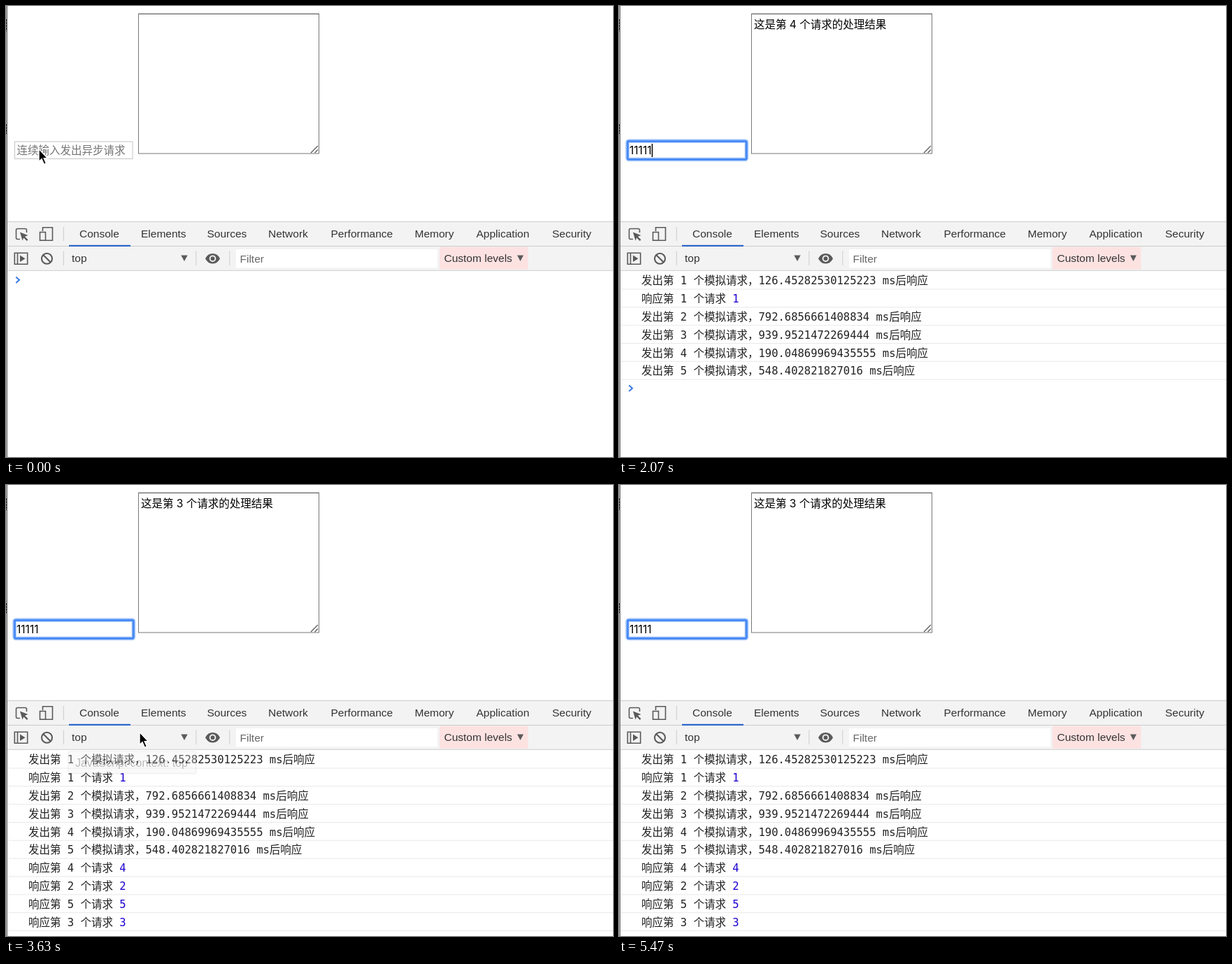
Write an HTML page that moves like this. It is 868 px wide and 645 px high and loops after 5910 ms.

```html
<!DOCTYPE html>
<html lang="zh-CN">
<head>
<meta charset="utf-8">
<style>
  html, body { margin: 0; width: 100%; height: 100%; overflow: hidden; background: #fff; }
  svg { display: block; }
  text { white-space: pre; }
  .ui { font: 15.5px "Liberation Sans", Arial, sans-serif; fill: #333; }
  .page { font: 15.5px Inter, "Noto Sans CJK SC", "Noto Sans CJK", sans-serif; }
  .log { font: 15.5px "DejaVu Sans Mono", "Noto Sans CJK SC", "Noto Sans CJK", monospace; fill: #222; }
  .num { fill: #1c00cf; }
  .icon { fill: none; stroke: #5a5a5a; stroke-width: 1.6; }
  .solid { fill: #5a5a5a; }
  .rule { stroke: #ccc; }
</style>
</head>
<body>
<svg width="868" height="645" viewBox="0 0 868 645">
  <path d="M1.3 0V645" stroke="#606060" stroke-width="1.4"/>
  <path d="M.4 19V36M.4 169V183" stroke="#222" stroke-dasharray="3 1"/>

  <!-- page -->
  <rect x="189.5" y="11.5" width="258" height="199.5" fill="#fff" stroke="#777"/>
  <path d="M189 11.2H448" stroke="#666"/>
  <path d="M436 210L446 200M441.5 210L446 205.500" stroke="#555" stroke-width="1.2"/>
  <text id="result" class="page" x="193" y="31.500"></text>
  <rect x="12.5" y="194" width="168.5" height="24.500" fill="#fff" stroke="#c4c4c4"/>
  <g id="ring" fill="none" stroke="#4a8cf5">
    <rect x="12" y="193" width="170.500" height="26.500" rx="2.500" stroke-width="6" opacity=".35"/>
    <rect x="12.300" y="193.300" width="170" height="26" rx="1.500" stroke-width="3.200"/>
  </g>
  <text id="hint" class="page" x="15.500" y="212" fill="#757575">连续输入发出异步请求</text>
  <text id="typed" class="page" x="15" y="212"></text>
  <rect id="caret" y="197" width="1.500" height="19"/>

  <!-- devtools bars -->
  <rect x="2" y="308" width="866" height="70" fill="#f3f3f3"/>
  <path class="rule" d="M2 308.500H868M2 343.500H868M2 378.300H868M82.300 316V336M82.300 350.500V371M271.800 350.500V371M319.800 350.500V371"/>
  <rect x="90" y="341.800" width="88" height="2.200" fill="#2a66c9"/>
  <g id="tabs" class="ui"></g>
  <path class="icon" d="M29.500 324V320.500Q29.500 318.500 27.500 318.500H16.500Q14.500 318.500 14.500 320.500V331.500Q14.500 333.500 16.500 333.500H20"/>
  <path class="solid" d="M20 323.500L31.500 328 27 329.800 31.500 334.300 29.800 336 25.300 331.500 23.500 335.500Z"/>
  <path class="icon" d="M52.500 322V316.800H66.500V335.200H57"/>
  <rect class="icon" x="48.500" y="323.500" width="8" height="11.700"/>
  <path class="icon" d="M12.300 353.300H30.700V369.200H12.300ZM16.500 353V369"/>
  <path class="solid" d="M20 356.500L27.500 361.200 20 366Z"/>
  <g class="icon" style="stroke-width:2.100">
    <circle cx="58.500" cy="361.200" r="7.500"/>
    <path d="M53.200 355.900L63.800 366.500"/>
  </g>
  <text class="ui" x="94" y="366">top</text>
  <path class="solid" d="M250.300 356.500H259.700L255 365Z"/>
  <path class="solid" d="M285 361.200Q288.500 354 295.500 354T306 361.200Q302.500 368.400 295.500 368.400T285 361.200Z"/>
  <circle cx="295.500" cy="361.200" r="4.800" fill="#f3f3f3"/>
  <circle class="solid" cx="295.500" cy="361.200" r="2.900"/>
  <rect x="329" y="348" width="288" height="26.500" fill="#fff"/>
  <text class="ui" x="334.500" y="367" style="fill:#666">Filter</text>
  <rect x="620" y="344.500" width="126.500" height="32.500" fill="#fde2e2"/>
  <text class="ui" x="626.500" y="366">Custom levels</text>
  <path class="solid" d="M731 356.500H740L735.500 365Z"/>

  <!-- console -->
  <g id="rows"></g>
  <path id="prompt" d="M14.300 387.500L19 391.700 14.300 396" fill="none" stroke="#3b78e7" stroke-width="2"/>

  <g id="tip">
    <rect x="88" y="381.500" width="185" height="33" rx="2" fill="#000" opacity=".07"/>
    <rect x="89" y="381" width="182.500" height="31.200" rx="1" fill="#f0f0f0" stroke="#c8c8c8"/>
    <text class="ui" x="99" y="402.500" style="font-size:15.900px;fill:#222">JavaScript context: top</text>
  </g>
  <path id="arrow" d="M0 -.5V17.500L4 13.800 7.300 21.300 10.400 20 7.200 12.700H12.500Z" stroke="#fff" stroke-width="1.400"/>
  <g id="beam" fill="none" stroke-linecap="round">
    <path d="M-4 -10Q0 -10 0 -7.500 0 -10 4 -10M0 -7.500V8M-4 10.500Q0 10.500 0 8 0 10.500 4 10.500M-2.500 2.500H2.500" stroke="#fff" stroke-width="3.500"/>
    <path d="M-4 -10Q0 -10 0 -7.500 0 -10 4 -10M0 -7.500V8M-4 10.500Q0 10.500 0 8 0 10.500 4 10.500M-2.500 2.500H2.500" stroke="#000" stroke-width="1.600"/>
  </g>
</svg>
<script>
const LOOP = 5910, PITCH = 25.83, FOCUS = 850;
const $ = id => document.getElementById(id);
const show = (el, on) => el.style.display = on ? '' : 'none';
const clamp = v => Math.max(0, Math.min(1, v));

const tabs = { Console: 105, Elements: 193, Sources: 287.5, Network: 375, Performance: 464.5,
  Memory: 584.5, Application: 672.5, Security: 781 };
$('tabs').innerHTML = Object.entries(tabs)
  .map(([name, x]) => `<text x="${x}" y="331">${name}</text>`).join('');

const keys = [1400, 1720, 1785, 1870, 1960];
const delays = ['126.45282530125223', '792.6856661408834', '939.9521472269444',
  '190.04869969435555', '548.402821827016'];
const replies = [[1530, 1], [2060, 4], [2513, 2], [2520, 5], [2725, 3]];

const log = [
  ...keys.map((at, i) => ({ at, text: `发出第 ${i + 1} 个模拟请求，${delays[i]} ms后响应` })),
  ...replies.map(([at, n]) => ({ at: at + 30, text: `响应第 ${n} 个请求 <tspan class="num">${n}</tspan>` }))
].sort((a, b) => a.at - b.at);

$('rows').innerHTML = log.map(({ text }, i) => `<g transform="translate(0 ${i * PITCH})">
  <text class="log" x="32" y="398.3">${text}</text>
  <path d="M2 405H868" stroke="#e8e8e8"/></g>`).join('');
const rows = [...$('rows').children];

// pointer stops: time, x, y
const path = [[0, 47, 205], [70, 47, 205], [600, 66.5, 208], [2600, 66.5, 208], [2720, 88.5, 207.500],
  [2850, 88.5, 207.500], [3050, 191, 354], [4100, 191, 354], [4500, 209, 367.500],
  [5030, 209, 367.500], [5230, 440, 200], [5400, 600, 15], [LOOP, 600, 15]];

function pointer(t) {
  const i = path.findIndex(p => p[0] > t);
  const [t0, x0, y0] = path[i - 1], [t1, x1, y1] = path[i];
  const u = (t - t0) / (t1 - t0), e = u * u * (3 - 2 * u);
  return [x0 + (x1 - x0) * e, y0 + (y1 - y0) * e];
}

function draw(t) {
  const typed = keys.filter(k => k <= t);
  const reply = replies.filter(r => r[0] <= t).pop();
  $('typed').textContent = '1'.repeat(typed.length);
  $('result').textContent = reply ? `这是第 ${reply[1]} 个请求的处理结果` : '';
  show($('hint'), !typed.length);
  show($('ring'), t >= FOCUS);

  const since = t - (typed.pop() ?? FOCUS);
  show($('caret'), since >= 0 && since % 1000 < 500);
  $('caret').setAttribute('x', 15.2 + $('typed').getComputedTextLength());

  const count = log.filter(l => l.at <= t).length;
  rows.forEach((row, i) => show(row, i < count));
  $('prompt').setAttribute('transform', `translate(0 ${count * PITCH})`);

  $('tip').style.opacity = clamp((t - 3570) / 200) * clamp((5380 - t) / 110);

  const [x, y] = pointer(t);
  const visible = t < keys[0] || (t > 2600 && t < 5400);
  const beam = t > 100 && y < 219 && x < 182;
  show($('beam'), visible && beam);
  show($('arrow'), visible && !beam);
  for (const id of ['beam', 'arrow']) $(id).setAttribute('transform', `translate(${x} ${y})`);
}

const start = performance.now();
(function tick() {
  draw((performance.now() - start) % LOOP);
  requestAnimationFrame(tick);
})();
</script>
</body>
</html>
```
